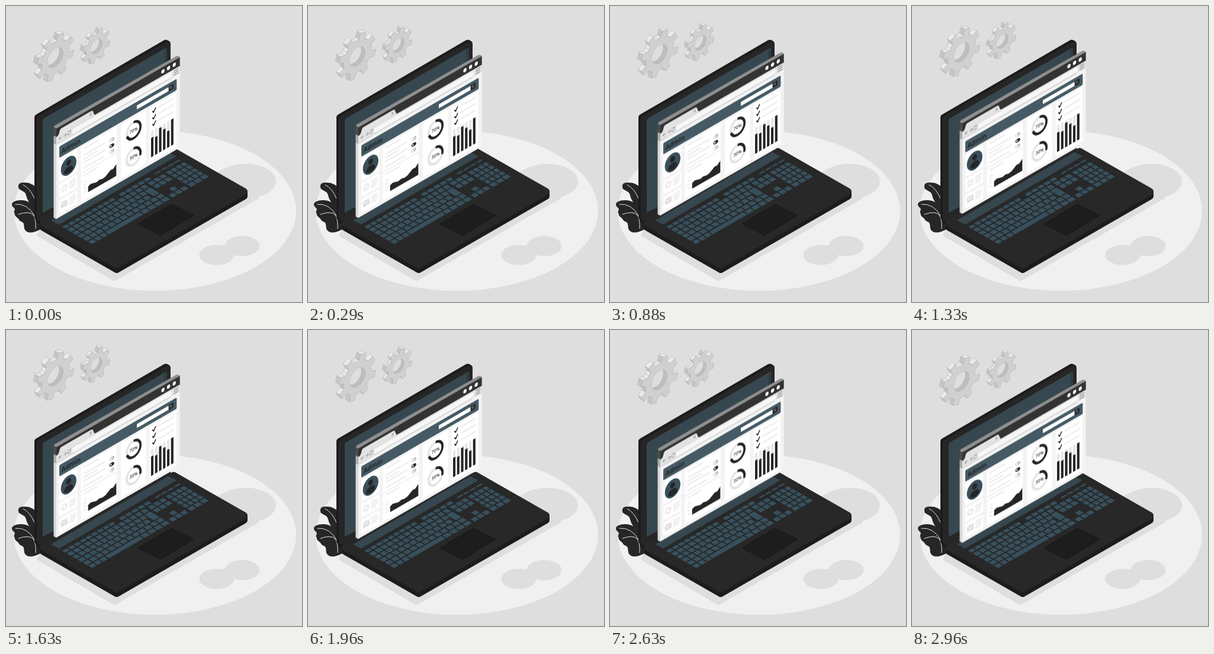
Animation, 500 px wide and 500 px high, one loop 3000 ms. Source, as an HTML page:

```html
<!DOCTYPE html>
<html lang="en">
<head>
<meta charset="utf-8">
<title>Admin dashboard</title>
<style>
html, body { margin: 0; width: 100%; height: 100%; overflow: hidden; background: #dedede; }
svg { display: block; width: 100%; height: 100%; }
text { font-family: "Open Sans", "Noto Sans", sans-serif; font-weight: 700; }
.float { animation: float 3s linear infinite; }
@keyframes float { 50% { transform: translateY(-10px); } }
.round { stroke-width: 12; stroke-linejoin: round; }
.vein { fill: none; stroke: #e4e4e4; stroke-width: 1; stroke-linecap: round; }
.icon { fill: none; stroke: #999; stroke-width: 1; }
.pale { fill: none; stroke: #e3e3e3; stroke-width: 1.5; }
.check { fill: none; stroke: #262626; stroke-width: 1.9; }
.card { fill: #fff; }
.ring { fill: none; stroke: #e4e4e4; stroke-width: 4.2; }
.arc { fill: none; stroke: #262626; stroke-width: 4.2; }
.pct { font-size: 8px; font-weight: 600; fill: #37474f; text-anchor: middle; }
</style>
</head>
<body>
<svg viewBox="0 0 500 500">
  <!-- floor and shadows -->
  <ellipse cx="251.5" cy="346" rx="238.5" ry="135" fill="#f0f0f0"/>
  <g fill="#dedede">
    <ellipse cx="405" cy="296" rx="51" ry="29.5"/>
    <path d="M350 285Q372 271 385 269L400 322 427 322V326L380 340Z"/>
    <ellipse cx="356" cy="420.5" rx="29.5" ry="17"/>
    <ellipse cx="399" cy="405.5" rx="29.5" ry="17"/>
    <path d="M366 405Q371 404 372 399L387 418Q384 420 384 424Z"/>
    <path d="M52 388L183 465 427 325 400 300 60 370Z"/>
  </g>

  <!-- plant -->
  <g fill="#262626">
    <path d="M52 308C46 300 36 297 27 298.500C20 299 20 305 22 309C27 313 33 313 34 320C36 330 44 336 52 350Z"/>
    <path d="M54 344C46 334 37 328 25 328C17 328 9 331 10 336C11 341 17 341 14 346C12 351 18 355 24 354C36 351 46 356 64 372Z"/>
    <path d="M60 350C42 342 23 344 15 350C13 355 20 357 22 361C24 365 28 363 30 368C31 374 30 378 35 381C42 385 52 381 64 374Z"/>
  </g>
  <path class="vein" d="M29 302Q41 308 48 325M16 335Q36 333 48 354M21 352Q40 345 47 354Q51 363 50 376"/>

  <!-- laptop lid -->
  <path class="round" fill="#1c1c1c" stroke="#1c1c1c" d="M54 188.500L270 63 272 64V240L57 362 54 356Z"/>
  <path class="round" fill="#262626" stroke="#262626" d="M58 191L272 67V240L58 357Z"/>
  <path d="M62 195Q62 191 65 189.300L268 72Q272 70 272 74V240L62 349Z" fill="#37474f"/>
  <path d="M267 73L272 74V240H267Z" fill="#2f3d44"/>

  <!-- laptop base -->
  <path class="round" fill="#1c1c1c" stroke="#1c1c1c" d="M63 368L283 246 402 314.500V321L187 445 63 374Z"/>
  <path class="round" fill="#282828" stroke="#282828" d="M63 367L283 245.700 402 313.500 187 437Z"/>
  <path d="M78 362L274 248 286 254 90 368Z" fill="#37474f" stroke="#37474f" stroke-width="2" stroke-linejoin="round"/>
  <g id="keys" transform="matrix(.866 -.5 .866 .5 95 373)" fill="#37505d"></g>
  <path d="M223 368L279 335 317 353.500 261 387.500Z" fill="#1d1d1d" stroke="#151515"/>

  <g class="float">
    <g id="gears" stroke="#a8a8a8" stroke-width=".5" stroke-linejoin="round"></g>

    <!-- window thickness -->
    <path d="M80.500 205Q80.500 203 83 201.500L288 84.500Q290 83.500 294 86.500L85 208Z" fill="#8f8f8f"/>
    <path d="M80.500 204L85 207V221L80.500 219Z" fill="#4d4d4d"/>
    <path d="M80.500 219L85 221V234L80.500 232Z" fill="#adadad"/>
    <path d="M80.500 232L85 234V360L80.500 357.500Z" fill="#d9d9d9"/>

    <!-- window face -->
    <g transform="matrix(.866 -.5 0 1 85 207)">
      <path d="M0 0H241V16H0Z" fill="#333"/>
      <path d="M0 14.500H241V27H0Z" fill="#e3e3e3"/>
      <path d="M0 15Q5 14 6 9 7 4.500 10 4.500H68Q71 4.500 72 8 73 13 76 15Z" fill="#e3e3e3"/>
      <path d="M0 27H241V151Q241 152.700 239 152.700H0Z" fill="#f3f3f3"/>
      <g fill="#fff">
        <circle cx="208" cy="7.300" r="3.200"/>
        <circle cx="219" cy="7.300" r="3.200"/>
        <circle cx="230" cy="7.300" r="3.200"/>
      </g>
      <path class="icon" d="M65 7.500L69 12M69 7.500L65 12M5 20H11M8 17.500L5 20 8 22.500M14 20H20M17 17.500L20 20 17 22.500M27.500 18A3 3 0 1 0 28 21M28 16V18.500H25.500"/>
      <rect x="31" y="17" width="194" height="8" rx="2" fill="#f7f7f7"/>
      <path class="icon" d="M229 17.500H238M229 21H238M229 24.500H238" style="stroke-width:1.300"/>

      <!-- header -->
      <rect x="5.800" y="33.500" width="229" height="19" rx="2" fill="#455a64"/>
      <text x="10" y="47.700" font-size="11.500" fill="#262626">Admin</text>
      <rect x="157" y="39.500" width="63" height="6.800" rx="1" fill="#fff"/>
      <rect x="219" y="38.500" width="9.500" height="8.500" rx="1" fill="#262626"/>
      <path d="M224.300 43.300L226 45" stroke="#999" stroke-width=".8"/>
      <circle cx="223.300" cy="42" r="1.600" fill="none" stroke="#999" stroke-width=".8"/>

      <!-- sidebar -->
      <rect class="card" x="5.800" y="56" width="35" height="38"/>
      <rect class="card" x="5.800" y="97.500" width="35" height="23"/>
      <rect class="card" x="5.800" y="124.500" width="35" height="23"/>
      <circle cx="24" cy="75" r="15.200" fill="#3a4f5a"/>
      <circle cx="24" cy="69.500" r="4.700" fill="#262626"/>
      <path d="M15 84Q15 76 24 76T33 84Q24 91 15 84Z" fill="#262626"/>
      <circle class="pale" cx="15.500" cy="108.500" r="3.700"/>
      <circle class="pale" cx="15.500" cy="108.500" r="5.700" stroke-dasharray="2.240 2.240"/>
      <rect x="9" y="130" width="13" height="10" fill="#dedede"/>
      <path d="M9 130.500L15.500 136 22 130.500" fill="none" stroke="#fff"/>
      <path class="pale" d="M25.500 103.500H38M25.500 107H38M25.500 110.500H38M25.500 114H36M25.500 130H38M25.500 133.500H38M25.500 137H38M25.500 140.500H36"/>

      <!-- switches -->
      <rect class="card" x="48" y="56" width="70" height="43"/>
      <path class="pale" d="M53 61H83M53 72H96M53 78H80M53 84H96M53 93.500H92"/>
      <g stroke="#b5b5b5" stroke-width=".7" fill="#fff">
        <rect x="104" y="70.500" width="8.500" height="5" rx="2.500"/>
        <rect x="104" y="80.500" width="8.500" height="5" rx="2.500" fill="#262626" stroke="#262626"/>
        <rect x="104" y="90" width="8.500" height="5" rx="2.500"/>
        <circle cx="110" cy="73" r="1.900" stroke="#777"/>
        <circle cx="106.500" cy="83" r="1.400" stroke="none"/>
        <circle cx="110" cy="92.500" r="1.900" stroke="#777"/>
      </g>

      <!-- area chart -->
      <rect class="card" x="48" y="101.500" width="70" height="46"/>
      <path class="pale" d="M53 106H81M53 116.500H59M53 122.500H59M53 128.500H59M53 134.500H59"/>
      <path d="M62 138.500V129L67 127 73 128.500 78 130 84 128.500 90 130 96 129 101 126 106 123 111 123.500 117 118.500V138.500Z" fill="#262626"/>

      <!-- rings -->
      <rect class="card" x="126" y="56" width="49" height="91.500"/>
      <g transform="translate(150.700 78.300)">
        <circle class="ring" r="13.500"/>
        <circle class="arc" r="13.500" pathLength="100" stroke-dasharray="70 30" transform="rotate(-90)"/>
        <text class="pct" y="3">70%</text>
      </g>
      <g transform="translate(150.700 122.700)">
        <circle class="ring" r="13.500"/>
        <circle class="arc" r="13.500" pathLength="100" stroke-dasharray="30 70" transform="rotate(-90)"/>
        <text class="pct" y="3">30%</text>
      </g>

      <!-- checklist and bars -->
      <rect class="card" x="182" y="56" width="52" height="91.500"/>
      <path class="check" d="M187.500 64.500L190 67.500 194 61.500M187.500 75.500L190 78.500 194 72.500M187.500 86.500L190 89.500 194 83.500"/>
      <path class="pale" d="M199 63.500H229M199 74.500H229M199 85.500H229"/>
      <g id="bars"></g>
    </g>
  </g>
</svg>
<script>
const byId = id => document.getElementById(id);
const rect = (x, y, w, h, fill) =>
  `<rect x="${x}" y="${y}" width="${w}" height="${h}"${fill ? ` fill="${fill}"` : ' rx=".8"'}/>`;

// n keys spread evenly from a to b
const gap = 2.2;
function run(v, h, a, b, n) {
  const pitch = (b - a + gap) / n;
  return Array.from({ length: n }, (_, i) => rect(a + i * pitch, v, pitch - gap, h)).join("");
}

const rowY = i => 9 + i * 10.3, keyH = 10.3 - gap;
let keys = run(0, 6.2, 0, 98, 9) + run(0, 6.2, 110, 168, 5) + run(0, 3, 180, 228, 4);
[[0, 152, 14], [0, 139, 13], [0, 136, 12], [0, 152, 13]].forEach(([a, b, n], i) => {
  keys += run(rowY(i), keyH, a, b, n);
});
keys += run(rowY(1), keyH + 10.3, 141, 152, 1);
keys += run(rowY(4), keyH, 0, 31, 3) + run(rowY(4), keyH, 33, 100, 1) + run(rowY(4), keyH, 102, 152, 4);
keys += run(rowY(0), keyH, 157, 188, 3) + run(rowY(1), keyH, 157, 188, 3);
keys += run(rowY(3), keyH, 168, 177, 1) + run(rowY(4), keyH, 157, 188, 3);
for (let i = 0; i < 5; i++) keys += run(rowY(i), keyH, 193, 228, i < 4 ? 4 : 3);
byId("keys").innerHTML = keys;

byId("bars").innerHTML = [108.5, 111, 100, 106, 113, 97].map((top, i) => {
  const x = 184.7 + i * 7.8;
  return rect(x, 96.5, 4.8, 44.5, "#e6e6e6") + rect(x, top, 4.8, 141 - top, "#262626");
}).join("");

// Extruded gear standing in the same plane as the window
function gear(cx, cy, k, id) {
  const depth = [-6.2 * k, -3.6 * k];
  const at = (r, deg) => {
    const a = deg * Math.PI / 180, x = r * k * Math.cos(a), y = r * k * Math.sin(a);
    return [cx + .866 * x, cy - .5 * x + y];
  };
  const back = p => [p[0] + depth[0], p[1] + depth[1]];
  const poly = (pts, fill, more = "") =>
    `<polygon points="${pts.map(p => p.map(n => n.toFixed(1))).join(" ")}" fill="${fill}" ${more}/>`;
  const edge = [], hole = [];
  for (let i = 0; i < 8; i++) {
    const a = 18 + i * 45;
    edge.push(at(27.5, a - 12), at(36.5, a - 8), at(36.5, a + 8), at(27.5, a + 12), at(26.5, a + 22.5));
  }
  for (let a = 0; a < 360; a += 10) hole.push(at(15, a));

  let out = "";
  edge.forEach((p, i) => {
    const q = edge[(i + 1) % edge.length];
    const nx = q[1] - p[1], ny = p[0] - q[0];
    if (nx * depth[0] + ny * depth[1] <= 0) return;
    out += poly([p, q, back(q), back(p)], ny < -Math.abs(nx) * .4 ? "#ebebeb" : "#c6c6c6");
  });
  out += poly(edge, "#d0d0d0") + poly(hole, "#bebebe");
  return out + `<clipPath id="${id}">${poly(hole, "#000")}</clipPath>` +
    poly(hole.map(back), "#dedede", `clip-path="url(#${id})"`);
}
byId("gears").innerHTML = gear(83.5, 87, 1, "holeA") + gear(152.7, 68, .74, "holeB");
</script>
</body>
</html>
```
